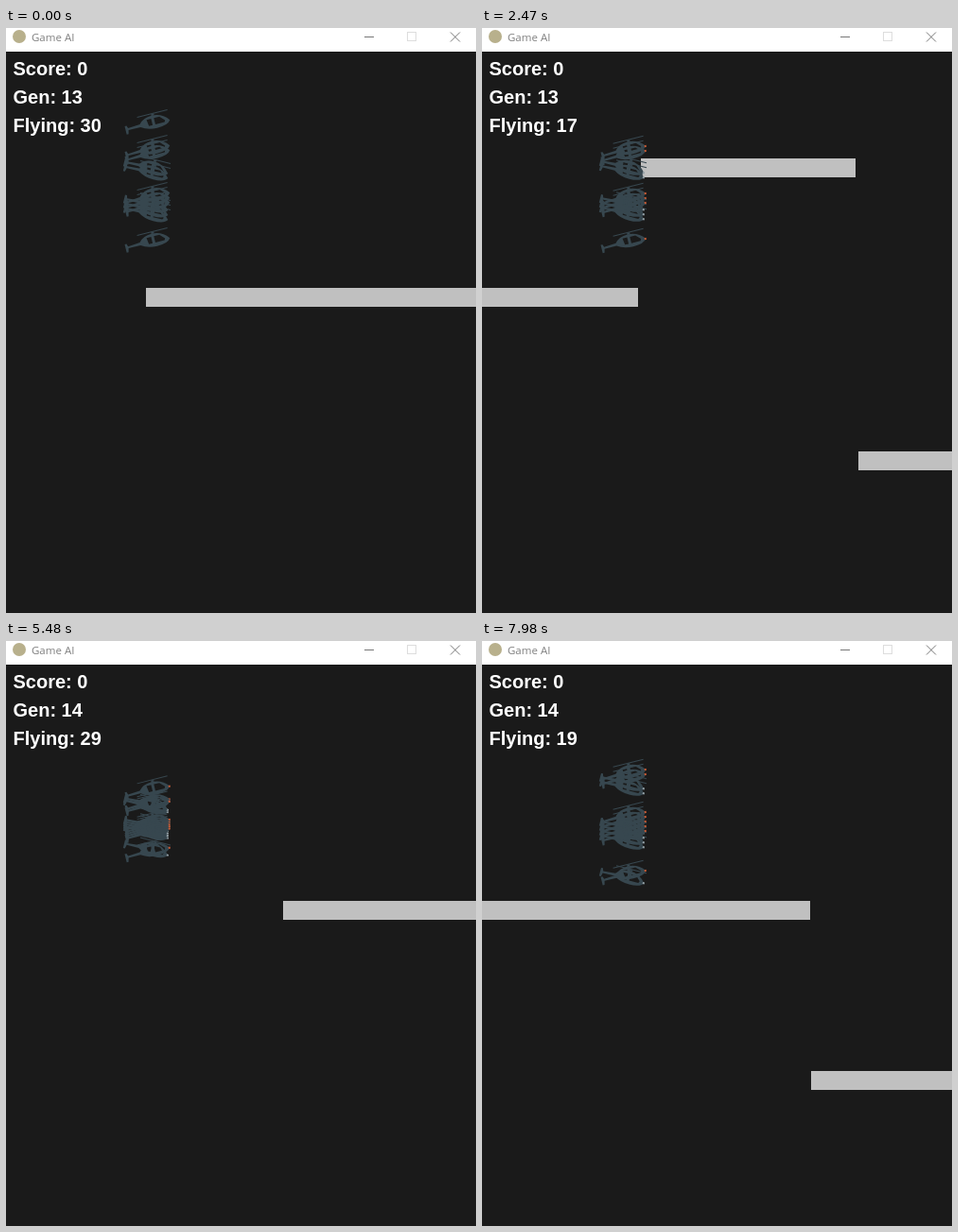
Animation, 497 px wide and 619 px high, one loop 8 s. Source, as an HTML page with a canvas:

```html
<!DOCTYPE html>
<html lang="en">
<head>
<meta charset="utf-8">
<title>Game AI</title>
<style>
  html, body { margin: 0; width: 100%; height: 100%; overflow: hidden; background: #1a1a1a; }
  canvas { display: block; }
</style>
</head>
<body>
<canvas id="stage" width="497" height="619"></canvas>
<script>
const ctx = document.getElementById('stage').getContext('2d');
const LOOP = 8000, RESET = 4150, LAUNCH = 4143, LEVEL = 4709, FALL = 2920;
const PERIOD = 825, SWING = 17, GRAVITY = 0.0006, TILT = 0.245;

const clamp01 = v => Math.max(0, Math.min(1, v));
const ramp = (t, from, to) => clamp01((t - from) / (to - from));

// Bars are [width, top], laid end to end; lanes are [height, half spread, pilots].
const generations = [
  { number: 13, left: 148, gap: 3, bars: [[387, 275], [227, 138], [270, 448], [300, 560]],
    lanes: [[140, 14, 4], [187, 11, 6], [224, 0, 1]],
    start: 0, leader: 99, climb: 0.155 },
  { number: 14, left: 443, gap: 1, bars: [[429, 275], [300, 455]],
    lanes: [[147, 8, 4], [198, 14, 9], [248, 2, 2]],
    start: 6320, leader: 112, climb: 0.1 }
];

// Pilots in a lane alternate between rising and sinking.
function makePilots({ lanes, start, leader, climb }) {
  const pilots = [t => leader - climb * Math.max(0, t - start)];
  for (const [height, spread, count] of lanes) {
    for (let i = 0; i < count; i++) {
      const side = i % 2 ? 1 : -1;
      const y = height + side * (spread - 2.5 * i);
      pilots.push(t => y + side * SWING * Math.sin(2 * Math.PI * (t - start) / PERIOD));
    }
  }
  return pilots;
}
for (const gen of generations) gen.pilots = makePilots(gen);

const drop = (t, since) => GRAVITY * (t - since) ** 2;
const fallY = t => 225 + drop(t, FALL);
const recoverY = t => t < 3360 ? fallY(t) : 458 - drop(t, 3800);
const sinkY = t => 387 + drop(t, LAUNCH);

// A new generation climbs as one, then fans out into its lanes.
function fanOut(pilot, t) {
  if (t < LEVEL) return 387 - drop(t, LAUNCH);
  return 195 + (pilot(t) - 195) * ramp(t, LEVEL, 6320);
}

const craft = new Path2D('M-9 1Q-4-5 5-5Q16-5 23 4Q20 9 8 9Q-2 9-9 4L-22 4L-23 8H-25V-1H-23L-22 2Z' +
  'M-1-2h5v7h-4zM7-2h6l5 5-1 2h-10zM5-6.5h3v1.5h-3zM-10-7.5h33v1h-33z');

function drawCraft(yAt, t) {
  const y = yAt(t), rising = yAt(t + 5) < yAt(t - 5);
  if (y < 37 || y > 607) return;
  ctx.save();
  ctx.translate(150, rising ? y : y - 2);
  ctx.rotate(rising ? -TILT : TILT);
  ctx.fillStyle = '#37474f';
  ctx.fill(craft, 'evenodd');
  if ((t > 900 && t < FALL) || t > 5000) {
    ctx.fillStyle = rising ? '#c85a34' : '#93a0a6';
    ctx.fillRect(21.5, 3, 2, 2);
  }
  ctx.restore();
}

function drawCrafts({ number, pilots }, t) {
  if (number === 14) {
    drawCraft(sinkY, t);
    const visible = t < LEVEL ? pilots.slice(0, 1) : pilots;
    visible.forEach(pilot => drawCraft(time => fanOut(pilot, time), t));
    return;
  }
  // The second bar takes the pilots out one after another.
  pilots.forEach((pilot, i) => {
    if (t < FALL - 36 * (pilots.length - 1 - i)) drawCraft(pilot, t);
  });
  if (t >= FALL) [fallY, recoverY].forEach(path => drawCraft(path, t));
}

function drawBars({ number, left, gap, bars }, t) {
  const step = Math.round(number === 13 ? t * 0.03 : (t - 4510) * 0.03 + 0.45);
  let x = left - 5 * step;
  ctx.fillStyle = '#c0c0c0';
  for (const [width, top] of bars) {
    ctx.fillRect(x, top, width, 20);
    x += width + gap;
  }
}

function flyingAt(t) {
  return Math.round(t < RESET
    ? 30 - 13 * ramp(t, 200, 700) - 15 * ramp(t, 2520, 3000) - ramp(t, 3700, 3720)
    : 50 - 21 * ramp(t, 4720, 4780) - 10 * ramp(t, 6720, 7300));
}

function drawHud({ number }, t) {
  const score = t > 2750 && t < RESET ? 1 : 0;
  ctx.font = 'bold 20px "Liberation Sans", Arial, sans-serif';
  ctx.fillStyle = '#fff';
  ['Score: ' + score, 'Gen: ' + number, 'Flying: ' + flyingAt(t)]
    .forEach((line, i) => ctx.fillText(line, 7.5, 50 + 30 * i));
}

function drawTitleBar() {
  ctx.fillStyle = '#fff';
  ctx.fillRect(0, 0, 497, 25);
  ctx.fillStyle = '#b8b08c';
  ctx.beginPath();
  ctx.arc(14, 9, 7, 0, 2 * Math.PI);
  ctx.fill();
  ctx.font = '11.5px "Open Sans", "Noto Sans", sans-serif';
  ctx.fillStyle = '#808080';
  ctx.fillText('Game AI', 27, 14);
  ctx.strokeStyle = '#777';
  ctx.stroke(new Path2D('M379 9.5h10M470 4.5l10 10M480 4.5l-10 10'));
  ctx.strokeStyle = '#ddd';
  ctx.strokeRect(424.5, 4.5, 9, 9);
}

function frame() {
  const t = performance.now() % LOOP;
  const gen = generations[t < RESET ? 0 : 1];
  ctx.fillStyle = '#1a1a1a';
  ctx.fillRect(0, 0, 497, 619);
  drawBars(gen, t);
  drawCrafts(gen, t);
  drawHud(gen, t);
  drawTitleBar();
  requestAnimationFrame(frame);
}
frame();
</script>
</body>
</html>
```
